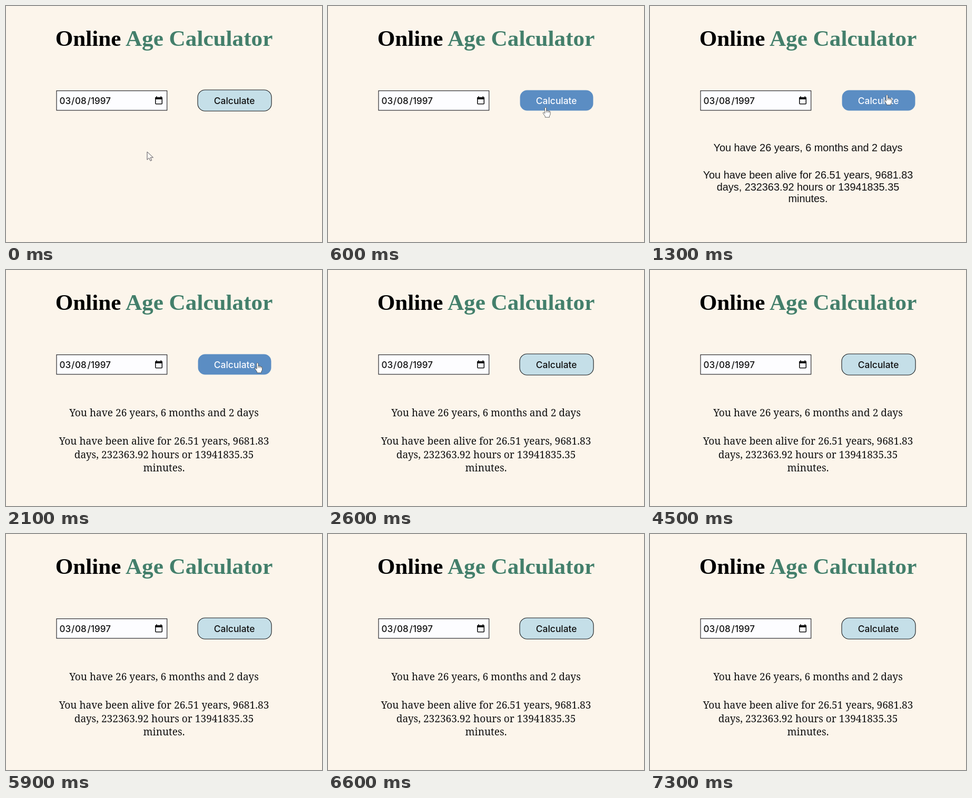
An HTML page that plays this animation: 600x450 px, repeating every 7.4 s.

```html
<!DOCTYPE html>
<html lang="en">
<head>
<meta charset="utf-8">
<title>Online Age Calculator</title>
<style>
  html, body { margin: 0; width: 100%; height: 100%; overflow: hidden; background: #fcf5eb; }
  svg { display: block; width: 600px; height: 450px; }
  text { fill: #111; white-space: pre; }
  .title { font: bold 43.2px "Liberation Serif", serif; fill: #000; }
  .title tspan { fill: #437f6b; }
  .ui { font: 500 17.4px Inter, sans-serif; }
  .date { font: 500 17px Inter, sans-serif; }
  .fallback { font: 19.85px "Liberation Sans", sans-serif; }
  .loaded { font: 19.1px "Noto Serif", serif; }
  .middle { text-anchor: middle; }
</style>
</head>
<body>
<svg viewBox="0 0 600 450">
  <rect width="600" height="450" fill="#fcf5eb"/>
  <text class="title middle" x="300" y="76">Online <tspan>Age Calculator</tspan></text>

  <rect x="96" y="161.6" width="209.7" height="37.3" fill="#fdfdff" stroke="#2b2b30" stroke-width="1.2"/>
  <g class="date">
    <text x="101.5" y="187">03</text><text x="124" y="187">/</text>
    <text x="131" y="187">08</text><text x="154.5" y="187">/</text>
    <text x="161" y="187">1997</text>
  </g>
  <rect x="283.9" y="174.6" width="12.4" height="12.2" rx="1" fill="none" stroke="#111" stroke-width="1.6"/>
  <path d="M283.2 174h13.8v4h-13.8zM285 172.2h1.8v2.5h-1.8zM293.4 172.2h1.8v2.5h-1.8z" fill="#111"/>

  <rect id="button"/>
  <text id="label" class="ui middle" x="433.7" y="187">Calculate</text>

  <g id="result" class="middle"></g>

  <path id="arrow" d="M0 0V15.2L3.7 11.8L6.2 17.3L8.7 16.2L6.3 10.9H11.5Z"
        fill="#fcf8f2" stroke="#55525c" stroke-linejoin="round"/>
  <g id="hand" stroke="#444" stroke-width=".8" stroke-linejoin="round" stroke-linecap="round">
    <path fill="#fff" d="M-1.5 1Q0 -1 1.5 1V6.4Q3 5.2 4.2 6.8Q5.8 5.8 6.8 7.5Q8.7 7 9 9V13Q8.8 15 7.3 16.5V19H-.8V17.2L-4.6 11.6Q-5.2 9.6 -3.6 9.6L-1.5 11.4Z"/>
    <path fill="none" d="M1.5 6.4V9.5M4.2 6.8V9.7M6.8 7.5V10"/>
  </g>
</svg>
<script>
const LOOP = 7400, STEP = 100;
const CLICK = 1000, FONT_READY = 1400;

// Pointer stops: time, x, y
const route = [
  [0, 268, 278], [100, 272, 275], [800, 448, 173], [1300, 450, 169.5],
  [1900, 455, 171], [2100, 477.5, 177], [2400, 610, 205]
];
const lines = [
  "You have 26 years, 6 months and 2 days",
  "You have been alive for 26.51 years, 9681.83",
  "days, 232363.92 hours or 13941835.35",
  "minutes."
];
const baselines = { fallback: [277, 329, 351.5, 374], loaded: [279, 333.3, 358.8, 384] };

const $ = id => document.getElementById(id);
const set = (id, attrs) => {
  for (const [name, value] of Object.entries(attrs)) $(id).setAttribute(name, value);
};
const show = (id, on) => set(id, { visibility: on ? "visible" : "hidden" });

for (const [font, ys] of Object.entries(baselines)) {
  $("result").innerHTML += `<g id="${font}" class="${font}">` +
    lines.map((line, i) => `<text x="300" y="${ys[i]}">${line}</text>`).join("") + "</g>";
}

function pointerAt(t) {
  const next = route.findIndex(stop => stop[0] > t);
  if (next < 0) return route[route.length - 1].slice(1);
  const [t0, x0, y0] = route[next - 1], [t1, x1, y1] = route[next];
  const p = (t - t0) / (t1 - t0), eased = p * p * (3 - 2 * p);
  return [x0 + (x1 - x0) * eased, y0 + (y1 - y0) * eased];
}

function draw(t) {
  const [x, y] = pointerAt(t);
  const hover = x > 364 && x < 504 && y > 160 && y < 200;

  set("button", hover
    ? { x: 364.6, y: 160.6, width: 138.9, height: 38.9, rx: 13.5, fill: "#5b8dc3", stroke: "none" }
    : { x: 364, y: 160, width: 140.1, height: 40.2, rx: 14, fill: "#c5dfe8", stroke: "#16191c", "stroke-width": 1.1 });
  $("label").style.fill = hover ? "#fafbff" : "#111";

  show("fallback", t >= CLICK && t < FONT_READY);
  show("loaded", t >= FONT_READY);
  show("arrow", !hover && x < 600);
  show("hand", hover);
  for (const id of ["arrow", "hand"]) set(id, { transform: `translate(${x} ${y})` });
}

const start = performance.now();
function tick() {
  const elapsed = (performance.now() - start) % LOOP;
  draw(Math.floor(elapsed / STEP) * STEP);
  requestAnimationFrame(tick);
}
tick();
</script>
</body>
</html>
```
